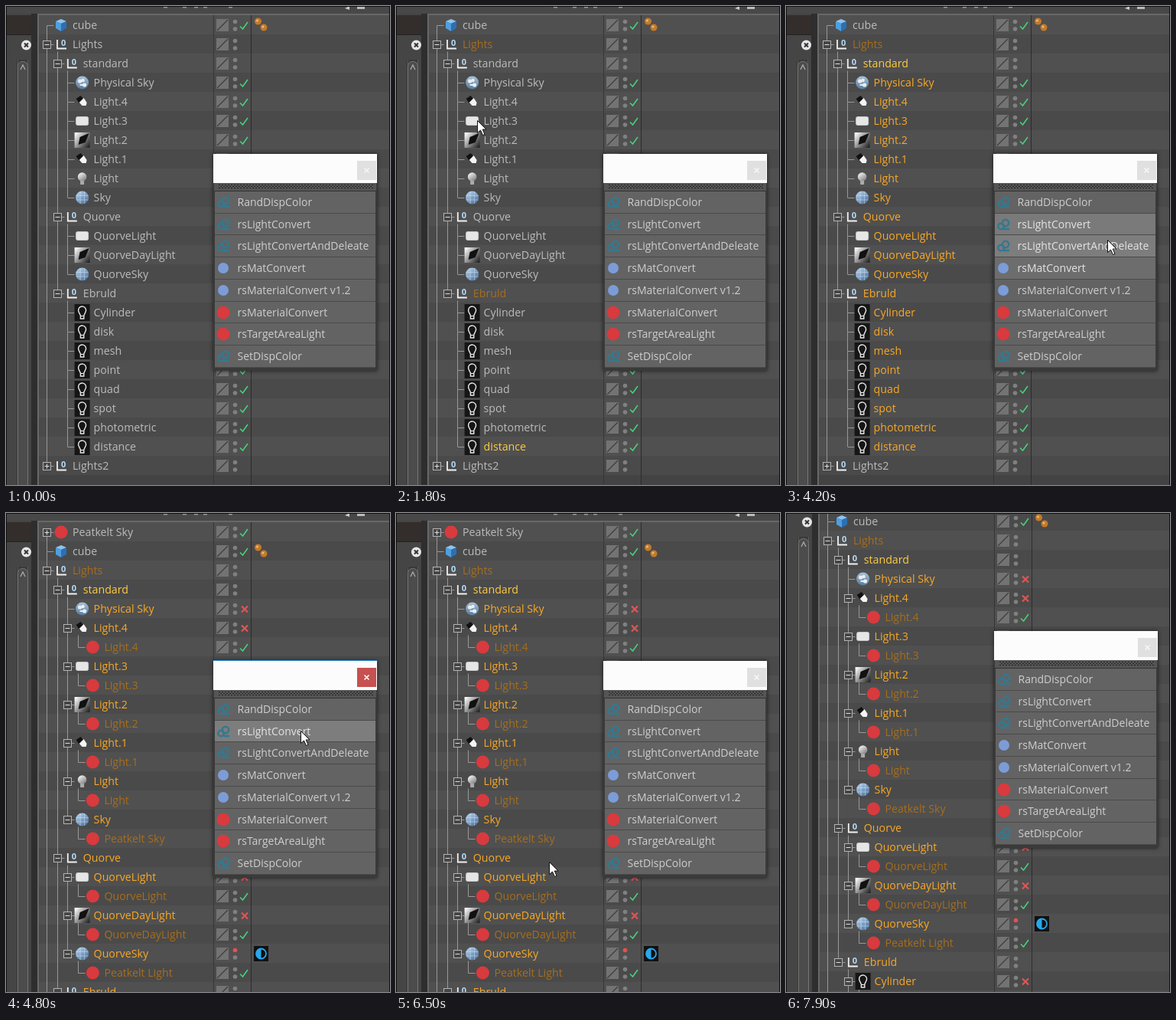
An HTML page with a canvas that plays this animation: 502x625 px, repeating every 8 s.

```html
<!DOCTYPE html>
<html lang="en">
<head>
<meta charset="utf-8">
<title>Light conversion</title>
<style>
  html, body { margin: 0; width: 100%; height: 100%; overflow: hidden; background: #444; }
  canvas { display: block; }
</style>
</head>
<body>
<canvas id="stage" width="502" height="625"></canvas>
<script>
const ctx = document.getElementById('stage').getContext('2d');
const LOOP = 8000, STEP = 100, ROW = 25, ITEM = 28.7;

// depth | icon | label | mark: v = check, x = cross, d = red dot, + = collapsed
const parse = text => text.trim().split('\n').map(line => {
  const [depth, icon, label, mark = ''] = line.trim().split('|');
  return { depth: +depth, icon, label, mark };
});

const before = parse(`
  0|cube|cube|v
  0|axes|Lights
  1|axes|standard
  2|cloud|Physical Sky|v
  2|spot|Light.4|v
  2|area|Light.3|v
  2|beam|Light.2|v
  2|spot|Light.1|v
  2|bulb|Light|v
  2|globe|Sky|v
  1|axes|Quorve
  2|area|QuorveLight|v
  2|beam|QuorveDayLight|v
  2|globe|QuorveSky|v
  1|axes|Ebruld
  2|lamp|Cylinder|v
  2|lamp|disk|v
  2|lamp|mesh|v
  2|lamp|point|v
  2|lamp|quad|v
  2|lamp|spot|v
  2|lamp|photometric|v
  2|lamp|distance|v
  0|axes|Lights2|+`);

const after = parse(`
  0|red|Peatkelt Sky|v+
  0|cube|cube|v
  0|axes|Lights
  1|axes|standard
  2|cloud|Physical Sky|x
  2|spot|Light.4|x
  3|red|Light.4|v
  2|area|Light.3|x
  3|red|Light.3|v
  2|beam|Light.2|x
  3|red|Light.2|v
  2|spot|Light.1|x
  3|red|Light.1|v
  2|bulb|Light|x
  3|red|Light|v
  2|globe|Sky|x
  3|red|Peatkelt Sky|v
  1|axes|Quorve
  2|area|QuorveLight|x
  3|red|QuorveLight|v
  2|beam|QuorveDayLight|x
  3|red|QuorveDayLight|v
  2|globe|QuorveSky|d
  3|red|Peatkelt Light|v
  1|axes|Ebruld
  2|lamp|Cylinder|x
  3|red|Cylinder|v
  2|lamp|disk|x
  0|axes|Lights2|+`);

const menu = [
  ['rings', 'RandDispColor'], ['rings', 'rsLightConvert'],
  ['rings', 'rsLightConvertAndDeleate'], ['blue', 'rsMatConvert'],
  ['blue', 'rsMaterialConvert v1.2'], ['red', 'rsMaterialConvert'],
  ['red', 'rsTargetAreaLight'], ['rings', 'SetDispColor']
];

// Pointer path: time, x, y
const path = [
  [300, 455, 608], [500, 420, 430], [600, 380, 312], [800, 250, 400], [1000, 133, 555],
  [1100, 141, 572], [1200, 142, 573], [1400, 142, 573], [1800, 106, 149], [2200, 122, 74],
  [2500, 125, 78], [2800, 125, 78], [3000, 124, 94], [3300, 300, 290], [3600, 486, 378],
  [3700, 488, 375], [3900, 440, 290], [4000, 425, 284], [4100, 421, 302], [4200, 420, 305],
  [4500, 385, 284], [5200, 385, 284], [5400, 300, 346], [6000, 170, 56], [6500, 200, 455],
  [6900, 300, 232], [7500, 196, -16]
];

function pointer(t) {
  const i = path.findIndex(p => p[0] >= t);
  if (i < 0 || t < path[0][0]) return null;
  const b = path[i], a = path[Math.max(0, i - 1)];
  const k = b === a ? 0 : (t - a[0]) / (b[0] - a[0]);
  return [a[1] + (b[1] - a[1]) * k, a[2] + (b[2] - a[2]) * k];
}

function rect(x, y, w, h, fill) {
  ctx.fillStyle = fill;
  ctx.fillRect(x, y, w, h);
}
function disc(x, y, r, fill) {
  ctx.fillStyle = fill;
  ctx.beginPath();
  ctx.arc(x, y, r, 0, 7);
  ctx.fill();
}
function ring(x, y, r, color, width = 1) {
  ctx.strokeStyle = color;
  ctx.lineWidth = width;
  ctx.beginPath();
  ctx.arc(x, y, r, 0, 7);
  ctx.stroke();
}
function trace(points) {
  ctx.beginPath();
  for (let i = 0; i < points.length; i += 2) ctx.lineTo(points[i], points[i + 1]);
}
function line(color, width, ...points) {
  ctx.strokeStyle = color;
  ctx.lineWidth = width;
  trace(points);
  ctx.stroke();
}
function poly(fill, ...points) {
  ctx.fillStyle = fill;
  trace(points);
  ctx.fill();
}
function gradient(x0, y0, x1, y1, from, to) {
  const g = ctx.createLinearGradient(x0, y0, x1, y1);
  g.addColorStop(0, from);
  g.addColorStop(1, to);
  return g;
}
function label(text, x, y, color, size = 14) {
  ctx.font = `${size}px "Open Sans", sans-serif`;
  ctx.fillStyle = color;
  ctx.fillText(text, x, y + 5);
}
function cross(x, y, r, color, width) {
  line(color, width, x - r, y - r, x + r, y + r);
  line(color, width, x + r, y - r, x - r, y + r);
}

// Each icon is drawn around its own centre
const icons = {
  cube() {
    poly('#8cc4f0', 0, -8, 7, -5, 0, -2, -7, -5);
    poly('#4f9fe0', -7, -5, 0, -2, 0, 8, -7, 4);
    poly('#2c70b4', 7, -5, 0, -2, 0, 8, 7, 4);
  },
  axes() {
    line('#f0f0f0', 1.8, -5, -6, -5, 5.5, 7, 5.5);
    ctx.font = 'bold 11px "Open Sans", sans-serif';
    ctx.fillStyle = '#b4dcfa';
    ctx.fillText('0', 0, 2);
  },
  globe() {
    disc(0, 0, 8.5, gradient(-6, -7, 6, 8, '#b0cce8', '#48709c'));
    for (const k of [-2.5, 3]) {
      line('#d4e4f4a0', .8, -8, k, 8, k);
      line('#d4e4f4a0', .8, k, -8, k, 8);
    }
  },
  cloud() {
    disc(0, 0, 8.5, gradient(0, -8, 0, 8, '#a8c0d4', '#587e9e'));
    disc(-3, -2, 2.6, '#e8eef4');
    disc(1, -3, 2.2, '#e8eef4');
    disc(3, 3, 2.6, '#e8eef4');
    rect(-3, 2, 6, 2, '#e8eef4');
  },
  spot() {
    poly('#111', -8, -4, -2, -8, 3, -2, -3, 3);
    poly('#f4f4f4', -4, 1, 2, -5, 6, 1, 5, 5, 0, 5);
  },
  area() {
    ctx.fillStyle = '#e6e6e6';
    ctx.beginPath();
    ctx.roundRect(-8, -5.5, 16, 11, 2);
    ctx.fill();
    ctx.strokeStyle = '#c8c8c8';
    ctx.lineWidth = 1;
    ctx.stroke();
  },
  beam() {
    rect(-10, -10, 20, 20, gradient(-10, -8, 10, 8, '#fff', '#222'));
    poly('#111', -5, 6, -3, -4, 9, -9, 4, 3);
  },
  bulb() {
    disc(0, -2, 5.8, gradient(-4, -7, 4, 4, '#f4f4f4', '#777'));
    rect(-2.5, 3, 5, 5, '#aaa');
  },
  lamp() {
    rect(-10, -11, 20, 22, '#161616');
    ctx.strokeStyle = '#e8e8e8';
    ctx.lineWidth = 1.4;
    ctx.beginPath();
    ctx.arc(0, -3, 5, 2.6, .54);
    ctx.lineTo(2.2, 4);
    ctx.lineTo(2.2, 8);
    ctx.lineTo(-2.2, 8);
    ctx.lineTo(-2.2, 4);
    ctx.closePath();
    ctx.stroke();
    line('#e8e8e8', 1.2, -2, 4.5, 2, 4.5);
  },
  red() { disc(0, 0, 8.5, '#d83a3e'); },
  blue() { disc(0, 0, 7, '#7c9cd8'); },
  rings() {
    ring(-3, 2.5, 3.8, '#34788f', 2.5);
    ring(3, -2, 4.2, '#34788f', 2.5);
    line('#34788f', 2.5, 0, 6, 8, 6);
  }
};
function icon(name, x, y) {
  ctx.save();
  ctx.translate(x, y);
  icons[name]();
  ctx.restore();
}

const GRAY = '#bcbcbc', ORANGE = '#f8a826', ACTIVE = '#ffcc40', BROWN = '#a66e1c';

function rowColor(row, t) {
  if (t < 1400) return GRAY;
  if (row.label === 'Lights') return BROWN;
  if (t < 2800) return row.label === 'distance' ? ACTIVE : row.label === 'Ebruld' ? BROWN : GRAY;
  if (row.label === 'standard') return ACTIVE;
  return [GRAY, ORANGE, ORANGE, BROWN][row.depth];
}

const levelX = depth => Math.round(54 + 13.6 * depth) - .5;
const rowY = i => 25 + ROW * i;

function drawLines(rows) {
  const color = '#989898';
  rows.forEach((row, i) => {
    const x = levelX(row.depth), y = rowY(i) + .5;
    line(color, 1, x, y, x + 9, y);
    const offset = rows.slice(i + 1).findIndex(r => r.depth <= row.depth);
    const next = i + 1 + offset;
    if (offset >= 0 && rows[next].depth === row.depth) line(color, 1, x, y, x, rowY(next));
    if (rows[i + 1]?.depth > row.depth) {
      const childX = levelX(row.depth + 1);
      line(color, 1, childX, y + 9, childX, y + ROW);
    }
  });
}

function drawRow(row, i, rows, t) {
  const y = rowY(i), shift = 13.8 * row.depth, closed = row.mark.includes('+');
  if (closed || rows[i + 1]?.depth > row.depth) {
    const x = levelX(row.depth);
    rect(x - 5.5, y - 5, 11, 11, '#b4b4b4');
    rect(x - 4.5, y - 4, 9, 9, '#464646');
    line('#ddd', 1, x - 3, y + .5, x + 3, y + .5);
    if (closed) line('#ddd', 1, x, y - 2.5, x, y + 3.5);
  }
  icon(row.icon, 72 + shift, y);
  label(row.label, 87 + shift, y, rowColor(row, t), 14.2);

  rect(275, y - 8, 16, 16, '#737373');
  line('#3e3e3e', 1.3, 276, y + 7, 290, y - 7);
  disc(299.5, y - 4.5, 2.8, row.mark === 'd' ? '#e85050' : '#808080');
  disc(299.5, y + 5, 2.8, '#808080');
  if (row.mark[0] === 'v') line('#48d07c', 1.6, 306, y + 1.5, 309.5, y + 5, 316, y - 4);
  if (row.mark === 'x') cross(312, y + .5, 4, '#e05454', 2.3);

  if (row.label === 'cube') {
    disc(329.5, y - 5, 4.5, '#c47a28');
    disc(337, y + 3, 4.5, '#c47a28');
    disc(328.5, y - 6, 1.6, '#f0b878');
    disc(336, y + 2, 1.6, '#f0b878');
  }
  if (row.mark === 'd') {
    rect(324, y - 10, 19, 20, '#111');
    ring(333.5, y, 6.5, '#28a8ec', 1.8);
    ctx.fillStyle = '#28a8ec';
    ctx.beginPath();
    ctx.arc(333.5, y, 6.5, Math.PI / 2, Math.PI * 1.5);
    ctx.fill();
  }
}

function drawTree(t) {
  const rows = t < 4700 ? before : after;
  rect(43, 0, 460, 680, '#434343');
  rows.forEach((row, i) => rect(43, rowY(i) - 13, 460, ROW, i % 2 ? '#4a4a4a' : '#505050'));
  drawLines(rows);
  rows.forEach((row, i) => drawRow(row, i, rows, t));
  rect(271, 12, 1, 660, '#353535');
  rect(320, 12, 1, 660, '#2c2c2c');
}

function drawSurround() {
  rect(0, 0, 42, 680, '#454545');
  rect(0, 0, 503, 10, '#484848');
  rect(0, 12, 33, 25, '#332e2b');
  rect(0, 37, 33, 1, '#222');
  rect(14, 70, 15, 610, '#3a3a3a');
  rect(15, 70, 1, 610, '#5a5a5a');
  rect(28, 70, 1, 610, '#5a5a5a');
  rect(33, 10, 8, 680, '#2e2e2e');
  rect(41, 10, 2, 680, '#686868');
  rect(41, 10, 462, 2, '#686868');
  ctx.fillStyle = '#4c4c4c';
  ctx.strokeStyle = '#777';
  ctx.lineWidth = 1;
  ctx.beginPath();
  ctx.roundRect(15.5, 72.5, 13, 620, 6);
  ctx.fill();
  ctx.stroke();
  line('#aaa', 1.3, 19, 83, 22, 77, 25, 83);
  disc(26.5, 51, 6.5, '#e6e6e6');
  cross(26.5, 51, 2.5, '#333', 2);
  for (const x of [206, 231, 246, 258, 291]) rect(x, 1, 5, 1.5, '#999');
  poly('#ccc', 443, 3, 449, 0, 449, 5);
  rect(459, 0, 10, 4, '#bbb');
}

const itemAt = p => p && p[0] > 272 && p[0] < 484 ? Math.floor((p[1] - 242) / ITEM) : -1;

// Menu rows light up a little late and fade after the pointer has left
function glow(i, t) {
  for (let lag = 100; lag < 500; lag += 50)
    if (itemAt(pointer(t - lag)) === i) return Math.min(1, 1.2 - lag / 500);
  return 0;
}

function drawMenu(t) {
  const active = t >= 4600 && t < 6200;
  ctx.save();
  ctx.shadowColor = '#000a';
  ctx.shadowBlur = 5;
  rect(271, 193, 214, 283, '#3a3a3a');
  ctx.restore();
  rect(271, 193, 214, 38, '#fcfcfc');
  if (active) rect(271, 192, 214, 1, '#2a8ad4');
  rect(459, 202, 25, 25, active ? '#c75050' : '#e0e0e0');
  cross(471.5, 214.5, 3, active ? '#fff' : '#f6f6f6', 1.6);

  rect(272, 231, 212, 11, '#555');
  for (let y = 0; y < 3; y++)
    for (let x = 278 + y % 2 * 2; x < 480; x += 4) rect(x, 233 + y * 2, 2, 1, '#222');
  rect(272, 241, 212, 1, '#333');

  menu.forEach(([name, text], i) => {
    const top = Math.round(242 + ITEM * i), bottom = Math.round(242 + ITEM * (i + 1));
    const k = glow(i, t), shade = 99 + 26 * k;
    rect(273, top, 210, bottom - top - 1, `rgb(${shade},${shade},${shade})`);
    rect(273, bottom - 1, 210, 1, '#4a4a4a');
    icon(name, 284, top + 14);
    label(text, 302.5, top + 14, k > .3 ? '#e4e4e4' : '#cecece');
  });
}

function drawPointer(x, y) {
  ctx.save();
  ctx.translate(x + .5, y + .5);
  ctx.lineJoin = 'round';
  poly('#fff', 0, 0, 0, 16, 4, 12.5, 7, 19, 9.5, 18, 6.7, 11.5, 11.5, 11.5);
  ctx.closePath();
  ctx.strokeStyle = '#111';
  ctx.lineWidth = 1;
  ctx.stroke();
  ctx.restore();
}

function draw(t) {
  ctx.save();
  if (t >= 7900) ctx.translate(1, -39);
  else if (t >= 7800) ctx.translate(0, -18);
  drawTree(t);
  drawSurround();
  drawMenu(t);
  const p = pointer(t);
  if (p) drawPointer(...p);
  ctx.restore();
  rect(0, 0, 502, 1, '#111');
  rect(0, 0, 1, 625, '#111');
  rect(501, 0, 1, 625, '#111');
}

const start = performance.now();
function tick() {
  const t = (performance.now() - start) % LOOP;
  draw(Math.floor(t / STEP) * STEP);
  requestAnimationFrame(tick);
}
tick();
</script>
</body>
</html>
```
